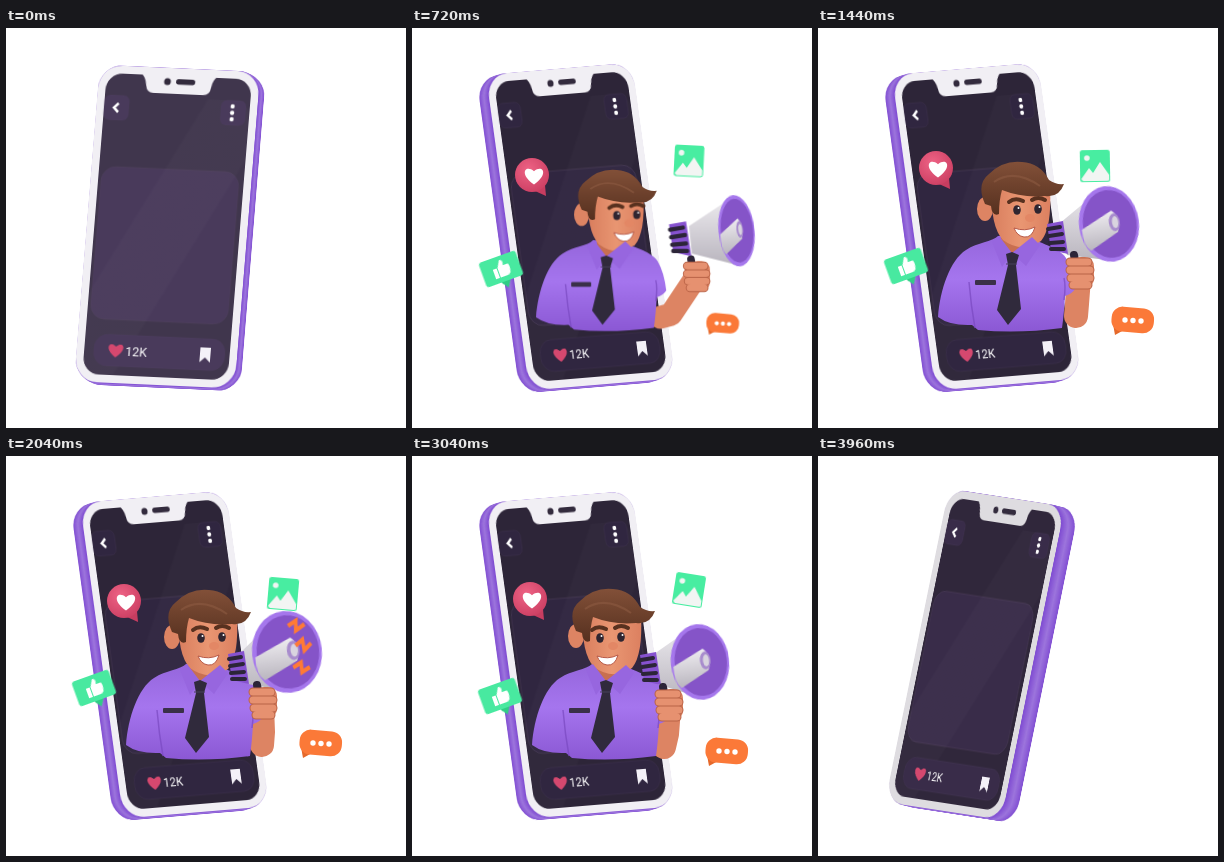
An HTML page for the animation above (4 s loop, 400x400 px).

```html
<!DOCTYPE html>
<html lang="en">
<head>
<meta charset="utf-8">
<title>Social media announcement</title>
<style>
html, body { margin: 0; width: 100%; height: 100%; overflow: hidden; background: #fff; }
#stage { position: relative; width: 400px; height: 400px; overflow: hidden; }
#scene { position: absolute; inset: 0; }
#phone { position: absolute; left: 79.5px; top: 40px; width: 168px; height: 320px;
  transform-style: preserve-3d; animation: spin 4s linear infinite; }
#phone i { position: absolute; inset: 0; border-radius: 24px; }
#phone svg { position: absolute; left: 0; top: 0; transform: translateZ(10px); }
#overlay { position: absolute; left: 0; top: 0; z-index: 1; }
#overlay g { animation: 4s ease-in-out infinite; }

/* Tilted phone turning once around the vertical axis */
@keyframes spin {
  0%    { transform: rotateX(-8.5deg) rotateY(-17.5deg) rotateX(16deg); }
  1%    { transform: rotateX(-8.5deg) rotateY(1deg) rotateX(16deg); }
  2%    { transform: rotateX(-8.5deg) rotateY(12deg) rotateX(16deg); }
  4%    { transform: rotateX(-8.5deg) rotateY(23deg) rotateX(16deg); }
  7%    { transform: rotateX(-8.5deg) rotateY(28deg) rotateX(16deg); }
  10%, 85% { transform: rotateX(-8.5deg) rotateY(29.5deg) rotateX(16deg); }
  88%   { transform: rotateX(-8.5deg) rotateY(33deg) rotateX(16deg); }
  91%   { transform: rotateX(-8.5deg) rotateY(45deg) rotateX(16deg); }
  93%   { transform: rotateX(-8.5deg) rotateY(85deg) rotateX(16deg); }
  95%   { transform: rotateX(-8.5deg) rotateY(160deg) rotateX(16deg); }
  97%   { transform: rotateX(-8.5deg) rotateY(243deg) rotateX(16deg); }
  98%   { transform: rotateX(-8.5deg) rotateY(282deg) rotateX(16deg); }
  99%   { transform: rotateX(-8.5deg) rotateY(313deg) rotateX(16deg); }
  100%  { transform: rotateX(-8.5deg) rotateY(342.5deg) rotateX(16deg); }
}
.frame  { animation: frame 4s linear infinite; }
.screen { animation: screen 4s linear infinite; }
.card   { animation: card 4s linear infinite; }
@keyframes frame  { 0%, 86%, 100% { fill: #f1eff4; } 91%, 99% { fill: #dddbdf; } }
@keyframes screen { 0%, 100% { fill: #40364d; } 6%, 86% { fill: #2d2538; } 91%, 99% { fill: #30273b; } }
@keyframes card   { 0%, 100% { fill: #493a5b; } 6%, 86% { fill: #302640; } 91%, 99% { fill: #392c49; } }

/* Bubbles: pop in and out, and bob in between */
#overlay .heart-pop { transform-origin: 122px 146px; animation-name: heartPop; }
#overlay .heart-bob { animation-name: heartBob; }
#overlay .like-pop  { transform-origin: 92px 241px; animation-name: likePop; }
#overlay .like-bob  { animation-name: likeBob; }
#overlay .pic-pop   { transform-origin: 277px 138px; animation-name: picPop; }
#overlay .pic-bob   { transform-origin: 277px 138px; animation-name: picBob; }
#overlay .chat-pop  { transform-origin: 297px 306px; animation-name: chatPop; }
#overlay .chat-bob  { animation-name: chatBob; }
@keyframes heartPop { 0%, 4% { transform: scale(0); } 11%, 89% { transform: scale(1); } 91% { transform: scale(.9); } 97%, 100% { transform: scale(0); } }
@keyframes heartBob { 0%, 18% { transform: translate(2px, 7px); } 36% { transform: none; } 51% { transform: translate(0, 5px); } 76% { transform: translate(0, 3px); } 91%, 100% { transform: translate(2px, 5px); } }
@keyframes likePop  { 0%, 7% { transform: scale(0); } 16%, 88% { transform: scale(1); } 91% { transform: scale(.77); } 96%, 100% { transform: scale(0); } }
@keyframes likeBob  { 0%, 18% { transform: translate(1px, 3px); } 36% { transform: none; } 51% { transform: translate(0, -6px); } 76%, 100% { transform: translate(0, 2px); } }
@keyframes picPop   { 0%, 11% { transform: scale(0); } 17% { transform: scale(.98); } 20%, 85% { transform: scale(1); } 90%, 100% { transform: scale(0); } }
@keyframes picBob   { 0%, 18% { transform: translate(0, -5px) rotate(3deg); } 36% { transform: translate(0, 0) rotate(-1deg); } 51% { transform: translate(0, 0) rotate(5deg); } 76%, 100% { transform: translate(0, -4px) rotate(9deg); } }
@keyframes chatPop  { 0%, 10% { transform: scale(0); } 14% { transform: scale(.5); } 18% { transform: scale(.77); } 23%, 87% { transform: scale(1); } 91% { transform: scale(.81); } 99%, 100% { transform: scale(0); } }
@keyframes chatBob  { 0%, 18%, 36% { transform: none; } 51% { transform: translate(0, -5px); } 76% { transform: translate(0, 3px); } 91%, 100% { transform: none; } }

/* Speaker */
#overlay .man { transform-origin: 201px 294px; animation: man 4s linear infinite; }
@keyframes man { 0%, 8% { transform: scale(0); } 11% { transform: scale(.45); } 14% { transform: scale(.82); } 18% { transform: scale(.95); } 22%, 84% { transform: scale(1); } 86% { transform: scale(.85); } 89% { transform: scale(.35); } 91% { transform: scale(.08); } 92%, 100% { transform: scale(0); } }
#overlay .head { animation-name: head; }
#overlay .face { animation-name: face; }
@keyframes head { 0%, 18% { transform: translate(1px, 0); } 36% { transform: none; } 51% { transform: translate(-1px, 0); } 76%, 100% { transform: translate(-3px, -1px); } }
@keyframes face { 0%, 18% { transform: translate(5px, 0); } 36% { transform: none; } 51% { transform: translate(-3px, 0); } 76%, 100% { transform: translate(-8px, 1px); } }

#overlay .grip { animation-name: grip; }
#overlay .bell { animation-name: bell; }
#overlay .hand { animation-name: hand; }
#overlay .bolts { animation: bolts 4s linear infinite; }
.cone { animation: cone 4s ease-in-out infinite; }
.arm  { animation: arm 4s ease-in-out infinite; }
@keyframes grip { 0%, 18% { transform: translate(270px, 207px) scale(1.12); } 36% { transform: translate(238px, 210px) scale(1); } 51% { transform: translate(231px, 212px) scale(1); } 76%, 100% { transform: translate(237px, 213px) scale(1); } }
@keyframes bell {
  0%, 18% { transform: translate(331px, 198px) rotate(-6deg) scale(.5, .99); }
  36% { transform: translate(291px, 196px) rotate(-8deg) scale(.79, 1); }
  51% { transform: translate(281px, 196px) rotate(-6deg) scale(.92, 1.08); }
  76%, 100% { transform: translate(288px, 206px) rotate(-6deg) scale(.77, 1); }
}
@keyframes hand { 0%, 18% { transform: translate(288px, 244px); } 36% { transform: translate(261px, 243px); } 51% { transform: translate(256px, 245px); } 76%, 100% { transform: translate(256px, 247px); } }
@keyframes cone {
  0%, 18% { d: path("M281 193 L326 163 L332 234 L284 222 Z"); }
  36% { d: path("M242 195 L284 160 L296 233 L249 227 Z"); }
  51% { d: path("M235 196 L274 158 L286 236 L242 228 Z"); }
  76%, 100% { d: path("M242 198 L282 170 L293 243 L248 229 Z"); }
}
@keyframes arm {
  0%, 18% { d: path("M251 289 L262 286 L286 250"); }
  36% { d: path("M258 288 L259 276 L261 250"); }
  51% { d: path("M256 289 L257 276 L256 250"); }
  76%, 100% { d: path("M252 291 L255 278 L257 252"); }
}
@keyframes bolts { 0%, 44% { opacity: 0; transform: scale(.5); } 46%, 56% { opacity: 1; transform: scale(1); } 58%, 100% { opacity: 0; transform: scale(1.1); } }
</style>
</head>
<body>
<div id="stage">
  <div id="scene"><div id="phone">
    <svg width="168" height="320" viewBox="0 0 168 320">
      <defs>
        <path id="heart" d="M0 7 C-13 -2 -7 -10 0 -4 C7 -10 13 -2 0 7 Z"/>
        <linearGradient id="sheen" x1="0" y1="0" x2="1" y2="1">
          <stop offset=".35" stop-color="#fff" stop-opacity="0"/>
          <stop offset=".36" stop-color="#fff" stop-opacity=".02"/>
          <stop offset=".6" stop-color="#fff" stop-opacity=".02"/>
          <stop offset=".61" stop-color="#fff" stop-opacity="0"/>
        </linearGradient>
      </defs>
      <rect class="frame" width="168" height="320" rx="24"/>
      <rect class="screen" x="8" y="8" width="152" height="304" rx="17"/>
      <path class="frame" d="M44 7 H124 Q119 10 118 18 Q117 26 110 26 H58 Q51 26 50 18 Q49 10 44 7 Z"/>
      <circle cx="72" cy="14" r="3.5" fill="#332b3d"/>
      <rect x="81" y="11" width="20" height="5.5" rx="2.7" fill="#332b3d"/>
      <rect class="card" x="11" y="102" width="144" height="154" rx="15" stroke="#51425f" stroke-opacity=".5"/>
      <rect x="8" y="30" width="152" height="282" rx="17" fill="url(#sheen)"/>
      <g class="card" stroke="#51425f" stroke-opacity=".25">
        <rect x="8" y="30" width="26" height="25" rx="6"/>
        <rect x="130" y="30" width="26" height="25" rx="6"/>
        <rect x="18" y="271" width="137" height="32" rx="14"/>
      </g>
      <path d="M23 38 L18.5 42.5 L23 47" fill="none" stroke="#fff" stroke-width="2.6"/>
      <g fill="#fff"><circle cx="142" cy="36" r="2.2"/><circle cx="142" cy="42.5" r="2.2"/><circle cx="142" cy="49" r="2.2"/></g>
      <use href="#heart" transform="translate(41 287)" fill="#d5486f"/>
      <text x="51" y="292" font-family="Roboto, sans-serif" font-size="13" fill="#fff">12K</text>
      <path d="M129 280 H140 V295 L134.5 290 L129 295 Z" fill="#f4f1f8"/>
    </svg>
  </div></div>

  <svg id="overlay" width="400" height="400" viewBox="0 0 400 400">
    <defs>
      <linearGradient id="shirt" x1="0" y1="0" x2="0" y2="1"><stop offset="0" stop-color="#9566dc"/><stop offset=".45" stop-color="#a575ee"/><stop offset="1" stop-color="#8b58d4"/></linearGradient>
      <linearGradient id="skin" x1="0" y1="0" x2="1" y2="0"><stop offset="0" stop-color="#d97e5e"/><stop offset=".5" stop-color="#e99672"/><stop offset="1" stop-color="#dc8060"/></linearGradient>
      <linearGradient id="hair" x1="0" y1="0" x2="0" y2="1"><stop offset="0" stop-color="#825038"/><stop offset="1" stop-color="#56301f"/></linearGradient>
      <linearGradient id="metal" x1="0" y1="0" x2="0" y2="1"><stop offset="0" stop-color="#eeecf0"/><stop offset="1" stop-color="#b9b5be"/></linearGradient>
      <radialGradient id="rose" cx=".4" cy=".35" r=".7"><stop offset="0" stop-color="#ee6385"/><stop offset="1" stop-color="#cc3f63"/></radialGradient>
    </defs>

    <g class="heart-bob"><g class="heart-pop">
      <path d="M121 156 L132 161 L131 150 Z" fill="#c73d60"/>
      <circle cx="118" cy="140" r="17" fill="url(#rose)"/>
      <use href="#heart" transform="translate(120 141) scale(1.2)" fill="#fff"/>
    </g></g>

    <g class="man">
      <path class="arm" d="M258 288 L259 276 L261 250" fill="none" stroke="#dd8463" stroke-width="24" stroke-linecap="round" stroke-linejoin="round"/>
      <path d="M120 289 C122 262 132 232 148 222 C160 214 174 214 180 208 H212 C220 216 240 218 248 230 Q255 242 257 261 Q254 266 247 268 Q246 286 244 300 Q200 306 160 302 L154 297 Q132 298 120 289 Z" fill="url(#shirt)"/>
      <path d="M151 254 Q153 278 157 300 M246 250 Q248 258 246 272" fill="none" stroke="#7a49c0" stroke-width="1.5" opacity=".7"/>
      <g class="head">
        <path d="M183 200 H213 V218 Q198 236 183 216 Z" fill="#c86f50"/>
        <ellipse cx="167" cy="181" rx="8" ry="12" fill="#dd8463"/>
        <path d="M174 160 Q172 198 185 212 Q204 226 223 213 Q234 200 232 160 Z" fill="url(#skin)"/>
        <g class="face">
          <path d="M191 174 Q197 169 205 173 M214 172 Q220 168 227 172" fill="none" stroke="#58311f" stroke-width="4" stroke-linecap="round"/>
          <ellipse cx="199" cy="182" rx="3.8" ry="4.8" fill="#2f2530"/>
          <ellipse cx="220" cy="181" rx="3.8" ry="4.8" fill="#2f2530"/>
          <circle cx="200.5" cy="180" r="1" fill="#fff"/><circle cx="221.5" cy="179" r="1" fill="#fff"/>
          <ellipse cx="212" cy="190" rx="5" ry="4" fill="#e38765"/>
          <path d="M196 200 Q207 204 217 199 Q214 210 206 209 Q199 208 196 200 Z" fill="#fff" stroke="#b75a48"/>
        </g>
        <path d="M167 176 Q158 156 171 146 Q185 132 204 134 Q222 135 231 152 Q238 157 246 156 Q241 170 227 168 Q204 170 184 162 Q181 172 181 186 Q174 189 173 178 Z" fill="url(#hair)"/>
        <path d="M176 154 Q196 140 222 158" fill="none" stroke="#8d5b41" stroke-width="2" opacity=".6"/>
      </g>
      <path d="M174 214 L181 208 L194 225 L184 239 Z M214 209 L222 217 L208 238 L194 225 Z" fill="#9766df"/>
      <path d="M188 226 L194 224 L201 227 L198 237 L203 281 L190 297 L179 282 L190 237 Z" fill="#302a3c"/>
      <path d="M188 236 H199" stroke="#46405a"/>
      <rect x="157" y="252" width="21" height="5" rx="1" fill="#3a3048"/>

      <path class="cone" d="M242 195 L284 160 L296 233 L249 227 Z" fill="url(#metal)"/>
      <g class="grip">
        <path d="M-9 -14 L7 -17 L12 16 L-5 12 Z" fill="#8652cf"/>
        <path d="M-8 -9 L4 -11 M-7 -2 L6 -4 M-6 5 L7 4 M-5 11 L8 11" stroke="#2c2538" stroke-width="4" stroke-linecap="round"/>
      </g>
      <g class="bell">
        <circle r="38" fill="#a577ec"/>
        <circle cx="1" r="34" fill="#8554c8"/>
        <path d="M-35 2 L5 -13 Q17 -5 10 9 L-27 24 Q-36 18 -35 2 Z" fill="url(#metal)"/>
        <ellipse cx="7" cy="-1" rx="7" ry="9" fill="#a88ccd"/>
        <ellipse cx="8" cy="-1" rx="4" ry="6" fill="#d9d4df"/>
        <g class="bolts" fill="none" stroke="#ff7a35" stroke-width="4">
          <path d="M4 -24 L13 -28 L12 -19 L22 -24 M10 -5 L18 -10 L19 0 L27 -6 M5 15 L14 11 L14 20 L23 16"/>
        </g>
      </g>
      <g class="hand">
        <path d="M-5 -16 L0 12" stroke="#2c2538" stroke-width="8" stroke-linecap="round"/>
        <rect x="-7" y="-14" width="22" height="31" rx="9" fill="#dc8261"/>
        <path d="M-9 -9 H9 M-9 -1 H11 M-8 7 H11 M-6 14 H9" stroke="#b96347" stroke-width="9" stroke-linecap="round"/>
        <path d="M-9 -9 H9 M-9 -1 H11 M-8 7 H11 M-6 14 H9" stroke="#e69170" stroke-width="7" stroke-linecap="round"/>
      </g>
    </g>

    <g class="like-bob"><g class="like-pop"><g transform="translate(88 238) rotate(-20)">
      <path d="M-5 12 L1 20 L6 12 Z" fill="#30cd85"/>
      <rect x="-19.5" y="-13" width="39" height="26" rx="3" fill="#48e9a0"/>
      <path d="M-8 -2 H-4 V8 H-8 Z M-3 -2 L1 -9 Q5 -9 3 -3 H8 Q10 -1 8 6 Q7 8 4 8 H-3 Z" fill="#fff"/>
    </g></g></g>

    <g class="pic-bob"><g class="pic-pop">
      <rect x="262" y="122" width="30" height="32" rx="2.5" fill="#48eda1"/>
      <path d="M263 151 L271 140 L275 145 L282 134 L291 147 V152 Q291 153 289 153 H265 Z" fill="#f2f5f3"/>
      <circle cx="269" cy="130" r="2.8" fill="#f2f5f3"/>
    </g></g>

    <g class="chat-bob"><g class="chat-pop">
      <path d="M295 296 L297 307 L306 302 Z" fill="#e5692b"/>
      <rect x="293.5" y="279.5" width="42.5" height="25" rx="11" fill="#fb7938" transform="rotate(5 315 292)"/>
      <g fill="#fff"><circle cx="307" cy="292" r="2.7"/><circle cx="315" cy="292.5" r="2.7"/><circle cx="323" cy="293" r="2.7"/></g>
    </g></g>
  </svg>
</div>
<script>
// Stack thin slabs to give the phone its thickness.
const phone = document.getElementById("phone");
const front = phone.firstElementChild;
for (let z = -10; z < 10; z++) {
  const slab = document.createElement("i");
  slab.style.transform = `translateZ(${z}px)`;
  slab.style.background = `hsl(263 60% ${66 - Math.abs(z + 1)}%)`;
  phone.insertBefore(slab, front);
}
</script>
</body>
</html>
```
